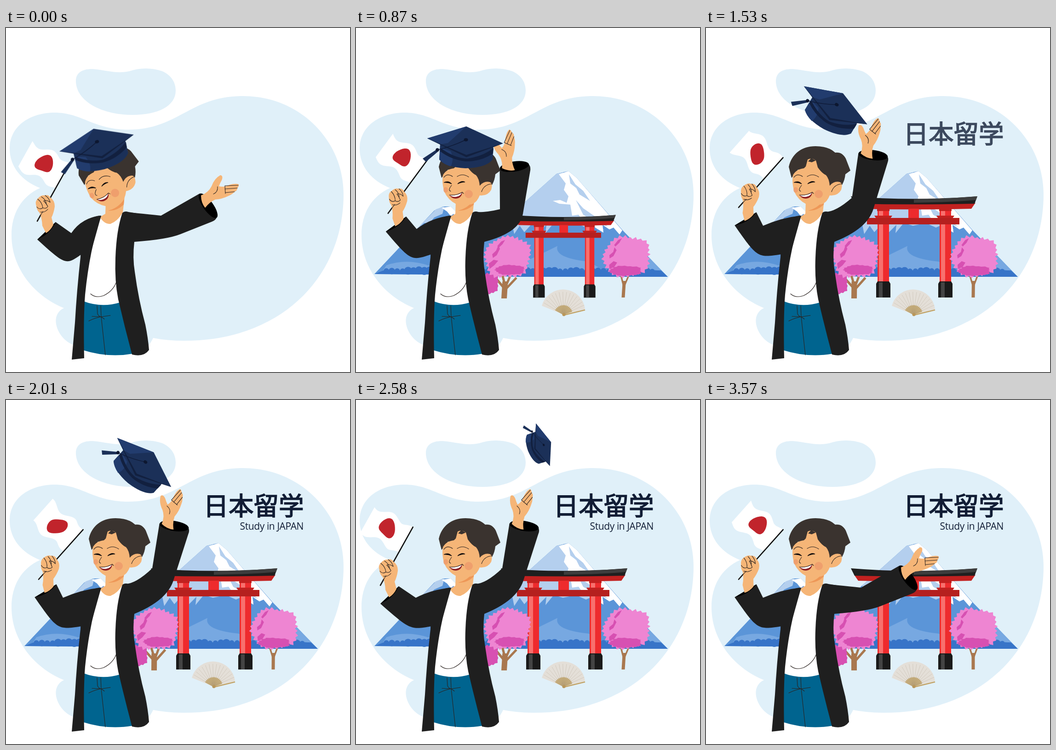
These frames come from a looping animation (748x748 px, 3.6 s). An HTML page:

```html
<!DOCTYPE html>
<html lang="ja">
<head>
<meta charset="utf-8">
<title>日本留学</title>
<style>
html, body { margin: 0; width: 100%; height: 100%; overflow: hidden; background: #fff; }
svg { display: block; width: 100vw; height: 100vh; }
.sky { fill: #e0f0f9; }
.skin { fill: #f5b577; }
.coat { fill: #1f1f1f; }
.hair { fill: #3a332f; }
.ink { fill: none; stroke: #2b2320; stroke-width: 1.1; stroke-linecap: round; stroke-linejoin: round; }
.snow { fill: #fff; }
.ice { fill: #b4cfee; }
.haze { fill: #77a8e1; }
.base { fill: #3774c8; }
.pink { fill: #ee85d2; }
.plum { fill: #d750b2; }
.wood { fill: none; stroke: #a9784f; }
.navy { fill: #1b3058; }
.night { fill: #12203f; }
.ribbon { fill: #223c6e; }
</style>
</head>
<body>
<svg viewBox="0 0 748 748">
  <path class="sky" d="M8 262C8 215 50 184 106 184C165 184 190 221 266 221C375 221 400 148 515 148C640 148 734 245 734 362C734 540 600 680 388 680Q350 680 320 674Q314 687 305 695L150 690C113 680 91 625 126 609C60 582 12 522 12 450C12 403 34 366 74 348C34 332 8 302 8 262Z"/>
  <path class="sky" d="M152 115C152 96 168 88 192 89.500C218 92 242 100 268 94C290 86 318 86 340 94C360 103 369 119 369 136C369 170 330 189 275 189C210 189 152 160 152 115Z"/>

  <g id="hills">
    <path fill="#5b95d8" d="M40 535L170 397L190 388L206 388L245 430L285 452L360 385L436 317L462 311L480 326L580 440L678 541H360L160 536Z"/>
    <path class="ice" d="M128 441L174 394L192 388L188 404L170 412L160 424L148 424Z"/>
    <path class="snow" d="M186 391L206 388L232 415L222 421L212 404L206 409L198 399Z"/>
    <path class="ice" d="M340 428V403L436 317L450 314L470 345L500 400L540 440L518 426L500 434L478 424L450 430L430 424L412 446L414 428L396 446L384 424L366 444L356 430L344 448Z"/>
    <path class="snow" d="M441 318L462 311L480 326L579 440L573 449L560 434L551 438L536 428L538 445L520 434L512 420L498 425L484 406L470 408L466 384L442 382L428 376L444 374L458 380L462 366L452 352L456 338Z"/>
    <path class="ice" d="M463 318L477 340L494 354L509 376L486 362L479 348L466 338ZM478 374L494 392L520 410L548 432L520 422L494 406Z"/>
    <path class="haze" d="M66 516Q110 500 160 517V528H58ZM372 506Q410 488 438 474Q430 500 506 508L540 528H372ZM600 500L624 486L668 531Q640 520 590 524Z"/>
    <path class="base" d="M40 535L60 527H663L678 541H360L160 536Z"/>
    <g id="bushes" class="base"></g>
  </g>

  <g id="gate">
    <g id="posts"></g>
    <path fill="#c22120" d="M322 380Q452 386 586 380L577 393Q452 396 331 393Z"/>
    <path fill="#ee2b2d" d="M440 393h23v21h-23Z"/>
    <path fill="#b5201f" d="M350 413H551V427H350Z"/>
    <path fill="#1f1f1f" d="M315 366Q452 377 590 366L584 382Q452 385 323 382Z"/>
    <path fill="#3d3d3d" d="M452 373Q530 371 590 366L587 374Q530 379 452 380Z"/>
  </g>

  <g id="trees">
    <g class="tree" data-base="588">
      <path class="wood" stroke-width="12" d="M322 588V551"/>
      <path class="wood" stroke-width="5" d="M321 566L302 545M324 568L346 543M321 556L314 534M326 556L334 534"/>
      <path class="plum" data-jag="288 556 20 23 30"/>
      <path class="pink" data-jag="324 498 50 45 58"/>
      <path class="plum" data-jag="331 526 32 11 34"/>
      <path class="plum" d="M290 492l8-8 4-12 4 8-6 14-8 6ZM300 474l8-10 8-3-5 9-8 8ZM284 512l10-8 10 2-8 10-10 8Z"/>
    </g>
    <g class="tree" data-base="586">
      <path class="wood" stroke-width="7" d="M581 586V550"/>
      <path class="wood" stroke-width="3.500" d="M580 560L573 538M582 560L590 538"/>
      <path class="pink" data-jag="583 497 51 44 56"/>
      <path class="plum" data-jag="583 528 35 11 34"/>
      <path class="plum" d="M545 494l8-7 2-10 5 6-6 13-8 5ZM554 472l8-11 8-4-5 10-8 8ZM546 515l9-8 8 3-6 10-10 4Z"/>
    </g>
  </g>

  <g id="fan">
    <path fill="#e4dfd8" d="M451 623L404 604A48 48 0 0 1 498 611Z"/>
    <path fill="#c9b07c" d="M451 624L433 614A20 20 0 0 1 470 617Z"/>
    <g id="ribs" stroke-width=".7" stroke="#c9c0b3"></g>
    <path fill="none" stroke="#c3a468" stroke-width="2.500" d="M453 624L498 613"/>
    <circle cx="452" cy="623" r="3.500" fill="#b9975a"/>
  </g>

  <g fill="#111d35">
    <text id="title" x="429.300" y="249.700" font-size="54.600" font-family="'Noto Sans CJK JP','Noto Sans CJK',sans-serif" stroke="#111d35" stroke-width="1.600">日本留学</text>
    <text id="sub" x="647" y="282" text-anchor="end" font-size="21" letter-spacing="-.4" font-family="'Open Sans','Noto Sans',sans-serif">Study in JAPAN</text>
  </g>

  <path fill="#00648f" d="M168 590H246L277 708Q222 718 166 700Z"/>
  <path class="ink" d="M198 604L199 622Q203 628 207 628L206 604M207 628L216 711M180 637Q194 630 207 628L227 625M187 627L207 628L214 633"/>
  <path class="snow" d="M203 411L252 404L250 470L247 597Q208 609 168 594L172 520Z"/>
  <path class="ink" stroke-width=".8" d="M184 578Q194 588 212 582Q233 572 240 552"/>
  <path class="skin" d="M217 376L216 404L204 411Q214 427 227 426Q243 420 254 401L258 366Z"/>
  <path fill="#ee9757" d="M222 397Q244 392 257 372L256 384Q240 399 222 397Z"/>
  <path class="coat" d="M207 408Q184 408 164 430L162 498Q154 570 150 640L143 721L170 718Q168 630 172 580Q182 480 207 408Z"/>
  <path class="coat" d="M253 402Q258 397 266 400L290 404L279 465Q275 500 280 530Q288 590 303 645Q309 675 311 700Q300 716 274 710Q258 650 244 590Q236 550 238 500Q240 440 253 402Z"/>

  <path id="sleeveL" class="coat"/>
  <g id="handL">
    <path d="M68 460L108 422Q96 448 68 460Z"/>
    <g transform="translate(68 420) rotate(-60.8)">
      <path id="flag" class="snow"/>
      <path id="disc" fill="#c1242c"/>
      <path stroke="#111" stroke-width="2.600" stroke-linecap="round" d="M0 0H145"/>
    </g>
    <path class="skin" d="M66 388Q62 376 70 370Q76 363 84 364Q92 361 97 369Q106 375 106 388Q104 402 99 412L103 428Q97 440 87 446L79 430Q78 412 73 402Q67 396 66 388Z"/>
    <path class="ink" d="M69 372Q79 380 80 391M77 367Q87 373 88 384M85 364Q94 370 96 379M96 379Q88 373 82 376Q88 382 91 388Q87 394 80 391Q73 396 67 389M75 400Q84 402 91 394M68 420L80 399"/>
  </g>

  <g id="head">
    <path class="hair" d="M180 302C186 274 208 257 238 257Q266 257 281 271Q296 269 304 284L314 310L303 318Q302 330 296 341L264 350L242 310L200 308L186 326Z"/>
    <path class="skin" d="M189 320Q196 307 213 305L217 301L221 286Q230 281 239 288L243 303Q252 316 261 320Q268 328 269 343Q278 332 291 335Q298 338 294 352Q286 366 269 364Q262 382 248 384Q232 388 218 383Q200 374 192 356Q186 336 189 320Z"/>
    <path class="hair" d="M222 290L229 283L239 288L230 292Z"/>
    <g fill="#ec9469" opacity=".65"><circle cx="245" cy="361" r="9"/><ellipse cx="195" cy="352" rx="5" ry="6"/></g>
    <path class="ink" d="M273 356Q278 341 294 339"/>
    <path class="ink" stroke-width="1.800" d="M191 325Q198 315 210 323M220 323Q232 315 245 324"/>
    <path d="M191 336Q201 331 208 339Q200 335 191 336ZM221 339Q229 331 237 335Q229 335 221 339Z" stroke="#1c1512" stroke-width="1.200"/>
    <path class="ink" d="M208 342Q199 353 206 355"/>
    <path fill="#8e1f22" d="M203 363Q218 365 231 357Q230 370 217 371Q208 371 203 363Z"/>
    <path class="snow" d="M204 363.500Q218 365 230 358Q228 365 218 367Q209 368 204 363.500Z"/>
    <path class="ink" d="M203 363Q218 365 231 357L234 360"/>
  </g>

  <path id="sleeveR" class="coat"/>
  <g id="handR">
    <ellipse cx="439.500" cy="386.500" rx="32" ry="11" transform="rotate(54.600 439.500 386.500)"/>
    <path class="skin" d="M424 364Q440 358 447 344Q453 327 466 320Q473 321 469 331Q465 338 463 344Q474 347 486 341Q500 337 506 340Q507 344 503 348Q503 354 497 356Q492 362 484 365Q470 372 455 373Q443 378 433 391Q424 380 424 364Z"/>
    <path class="ink" d="M476 343L505 342M476 350L503 348M477 358L497 356M476 343L477 360M460 345Q461 357 451 361"/>
  </g>

  <g id="cap">
    <path class="navy" d="M183 250L181 286Q196 303 238 305Q283 304 297 286L299 250Z"/>
    <path class="ribbon" d="M183 260L181 286Q190 296 206 301Q214 286 206 268Z"/>
    <path class="night" d="M184 261Q214 283 242 284Q276 279 299 261L298 273Q270 291 238 290Q206 286 183 268Z"/>
    <path class="navy" d="M155 240L240 214L320 251L240 279Z"/>
    <path class="ribbon" d="M155 240L240 214L200 250L184 253Z"/>
    <path class="night" d="M155 240L240 276L320 251L240 281Z"/>
    <path fill="none" stroke="#0f1b38" stroke-width="1.500" d="M239 243Q208 258 177 265"/>
    <ellipse cx="239" cy="243" rx="4.500" ry="3.500" fill="#0d1730"/>
    <path class="navy" d="M174 265L178 269L152 291L145 284Z"/>
    <circle cx="177" cy="265" r="3.800" fill="#0d1730"/>
  </g>
</svg>
<script>
const LOOP = 3600, TAU = 2 * Math.PI;

// Right arm: elbow, turn of the forearm, inner and outer bend of the sleeve.
const REST = [337, 436, 0, 337, 408, 350, 460];
const BENT = [342, 415, -63, 313, 394, 356, 445];
const THROWN = [330, 382, -46, 318, 366, 350, 436];

// Left arm: foot of the flag stick, turn of the hand, elbow.
const LOW = [68, 420, 0, 130, 516];
const HIGH = [71, 390, 12.6, 112, 500];
const BACK = [53, 403, 0, 118, 500];

const $ = id => document.getElementById(id);
const set = (id, name, value) => $(id).setAttribute(name, value);
const range = n => [...Array(n).keys()];
const fade = (t, from, to) => Math.min(1, Math.max(0, (t - from) / (to - from)));
const ease = (t, from, to) => {
  const u = fade(t, from, to);
  return u * u * (3 - 2 * u);
};
const poly = pts => "M" + pts.map(p => p.map(n => n.toFixed(1)).join(" ")).join("L") + "Z";
const spin = (x, y, deg) => {
  const a = deg * TAU / 360, c = Math.cos(a), s = Math.sin(a);
  return [x * c - y * s, x * s + y * c];
};

// Moves from pose to pose; each step is [from, to, pose].
const pose = (t, first, ...steps) => steps.reduce((now, [from, to, next]) =>
  now.map((n, i) => n + (next[i] - n) * ease(t, from, to)), first);

let seed = 7;
const rnd = () => (seed = seed * 16807 % 2147483647) / 2147483647;

function jag(cx, cy, rx, ry, n) {
  return poly(range(n).map(i => {
    const a = i / n * TAU;
    const r = .97 + .05 * Math.sin(a * 5 + cx) + (i % 2 ? .02 + rnd() * .07 : -.05);
    const box = Math.pow(Math.cos(a) ** 4 + Math.sin(a) ** 4, -.1);
    return [cx + rx * r * box * Math.cos(a), cy + ry * r * box * Math.sin(a)];
  }));
}

function build() {
  document.querySelectorAll("[data-jag]").forEach(el =>
    el.setAttribute("d", jag(...el.dataset.jag.split(" ").map(Number))));

  $("bushes").innerHTML = range(50).map(i =>
    `<circle cx="${66 + i * 11.8}" cy="${527 + rnd() * 2}" r="${5 + rnd() * 4}"/>`).join("");

  $("posts").innerHTML = [373, 508].map(x => `
    <path fill="#ee2b2d" d="M${x} 393h25v162h-25Z"/>
    <path fill="#f8706d" d="M${x + 3} 395h9v160h-9Z"/>
    <path fill="#c22120" d="M${x - 7} 408h39l-4 6h-31ZM${x - 1} 393h27v5h-27Z"/>
    <path fill="#1a1a1a" d="M${x - 3} 586v-30l3-5h25l3 5v30Z"/>
    <path fill="#444" d="M${x + 3} 553h8v33h-8Z"/>`).join("");

  $("ribs").innerHTML = range(14).map(i => {
    const [x, y] = spin(-46, -18, (i + 1) * 9.6);
    return `<path d="M451 623l${x} ${y}"/><path stroke="#a98c55" d="M451 623l${x * .43} ${y * .43}"/>`;
  }).join("");
}

function drawFlag(t) {
  const phase = TAU * (t - 1530) / 900;
  const bend = (u, v) => [u + 6 * Math.min(1, v / 25) * Math.sin((v - 47) / 10 + phase), -v];
  const edge = range(24).map(i => i * 94 / 23);
  set("flag", "d", poly([...edge.map(v => bend(145, v)), ...edge.reverse().map(v => bend(82, v))]));
  set("disc", "d", poly(range(32).map(i => {
    const [x, y] = spin(19, 0, i * 360 / 32);
    return bend(113.5 + x, 47 + y);
  })));
}

function drawLeft(t) {
  const [sx, sy, turn, ex, ey] = pose(t, LOW, [0, 1600, HIGH], [2010, 2580, BACK], [3250, 3570, HIGH]);
  const at = (x, y) => {
    const [dx, dy] = spin(x - 68, y - 420, turn);
    return `${sx + dx} ${sy + dy}`;
  };
  set("handL", "transform", `translate(${sx} ${sy}) rotate(${turn}) translate(-68 -420)`);
  set("sleeveL", "d", `M${at(68, 460)}C${ex} ${ey} ${ex} ${ey} 164 492L184 490L207 408Q165 412 ${ex + 12} ${ey - 70}L${at(108, 422)}Z`);
}

function drawRight(t) {
  const [ex, ey, turn, ix, iy, ox, oy] = pose(t, REST, [0, 870, BENT], [870, 1700, THROWN], [2600, 3570, REST]);
  const at = (x, y) => {
    const [dx, dy] = spin(x - 337, y - 436, turn);
    return [ex + dx, ey + dy];
  };
  const [bx, by] = at(448, 421);
  set("handR", "transform", `translate(${ex} ${ey}) rotate(${turn}) translate(-337 -436)`);
  set("sleeveR", "d", `M256 400Q280 402 ${ix} ${iy}L${at(421, 360)}L${at(458, 412)}Q${at(456, 418)} ${bx} ${by}`
    + `L${ox + (bx - ox) * .3} ${oy + (by - oy) * .3}Q${ox} ${oy} 279 465L250 470Z`);
}

// The cap rides on the head, is tossed up, then sails off and shrinks.
function drawCap(t, tilt) {
  const [hx, hy] = spin(6, -144, tilt);
  const toss = ease(t, 870, 1900), sail = Math.max(0, t - 2010) / 570;
  const x = 233 + hx + 64 * toss + 105 * sail;
  const y = 387 + hy - 108 * toss - 64 * sail + 26.7 * sail * sail;
  const size = Math.max(0, 1 - .04 * toss - .37 * sail);
  const turn = tilt + 38.4 * toss + 29.6 * sail;
  set("cap", "transform", `translate(${x} ${y}) rotate(${turn}) scale(${size}) translate(-239 -243)`);
}

function draw(t) {
  set("hills", "opacity", fade(t, 0, 540));
  set("trees", "opacity", fade(t, 0, 450));
  set("fan", "opacity", fade(t, 150, 600));
  set("title", "opacity", fade(t, 1130, 1640));
  set("sub", "opacity", fade(t, 1600, 2000));
  set("gate", "transform", `translate(452.5 587) scale(${fade(t, 185, 1025)}) translate(-452.5 -587)`);

  const sway = 1.85 * (1 - Math.cos(TAU * t / 1800));
  document.querySelectorAll(".tree").forEach(el => {
    const y = el.dataset.base;
    el.setAttribute("transform", `translate(0 ${y}) skewX(${-sway}) translate(0 ${-y})`);
  });

  const tilt = -16.5 * (1 - ease(t, 0, 870));
  set("head", "transform", `rotate(${tilt} 233 387)`);
  drawCap(t, tilt);
  drawFlag(t);
  drawLeft(t);
  drawRight(t);
}

function tick() {
  draw(performance.now() % LOOP);
  requestAnimationFrame(tick);
}

build();
tick();
</script>
</body>
</html>
```
